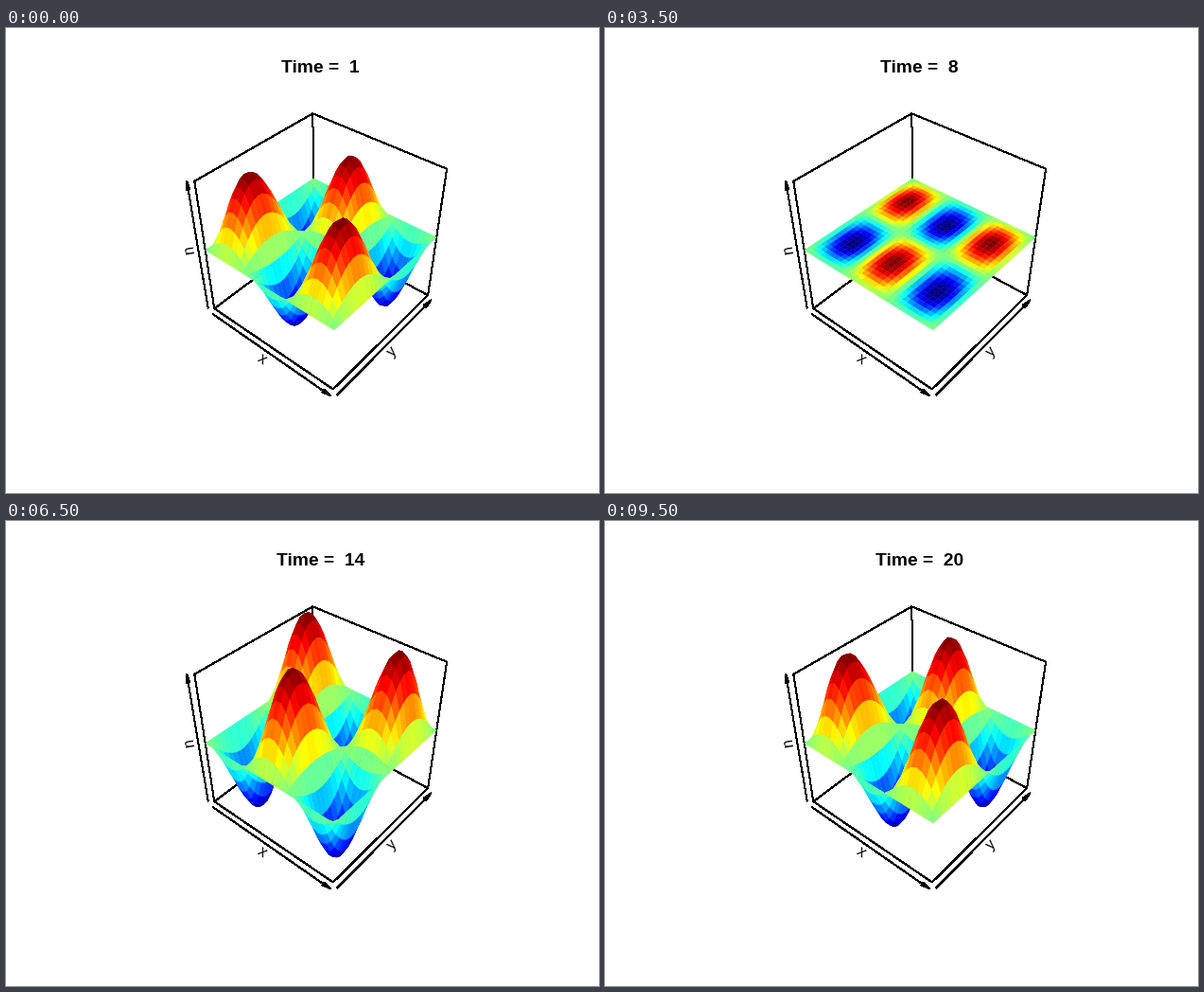
Write a matplotlib script that moves like this. It is 627 px wide and 491 px high and loops after 10000 ms.

```python
import numpy as np
import matplotlib.pyplot as plt
from matplotlib.animation import FuncAnimation
from matplotlib.collections import LineCollection, PolyCollection
from matplotlib.colors import LinearSegmentedColormap

W, H, DPI = 627, 491, 64
PX = 72 / DPI                      # points per pixel
N_FRAMES, INTERVAL = 20, 500
GRID_POINTS = 30
OMEGA = 0.03 * np.pi * np.sqrt(13)  # phase advance per step
THETA = PHI = np.radians(40)
DISTANCE = np.sqrt(3) + 6
BOX_CENTER, BOX_HEIGHT = (332.7, 235.9), 291.1

JET = LinearSegmentedColormap.from_list(
    "jet_dark", ["#00007F", "#0000FF", "#007FFF", "#00FFFF", "#7FFF7F",
                 "#FFFF00", "#FF7F00", "#FF0000", "#7F0000"], N=100)


def perspective(x, y, z):
    """Project points of the [-1, 1] cube to the view plane."""
    right = x * np.cos(THETA) + y * np.sin(THETA)
    near = x * np.sin(THETA) - y * np.cos(THETA)
    up = z * np.cos(PHI) - near * np.sin(PHI)
    depth = DISTANCE - z * np.sin(PHI) - near * np.cos(PHI)
    return np.stack([right / depth, up / depth], axis=-1)


signs = np.array([(x, y, z) for x in (-1, 1) for y in (-1, 1) for z in (-1, 1)])
corners = perspective(*signs.T)
low, high = corners.min(axis=0), corners.max(axis=0)
SCALE = BOX_HEIGHT / (high[1] - low[1])


def to_pixels(x, y, z):
    return BOX_CENTER + (perspective(x, y, z) - (low + high) / 2) * (SCALE, -SCALE)


def arrow(start, tip, length=9.6, angle=10):
    """Shaft and open head as line segments."""
    start, tip = np.array(start), np.array(tip)
    back = (start - tip) / np.hypot(*(start - tip)) * length
    c, s = np.cos(np.radians(angle)), np.sin(np.radians(angle))
    wings = [tip + np.array([[c, -k * s], [k * s, c]]) @ back for k in (1, -1)]
    return [[start, tip], [wings[0], tip, wings[1]]]


fig = plt.figure(figsize=(W / DPI, H / DPI), dpi=DPI, facecolor="white")
ax = fig.add_axes([0, 0, 1, 1])
ax.set_xlim(0, W)
ax.set_ylim(H, 0)
ax.axis("off")

# Box: every edge except those meeting the near top corner.
near_top = (1, -1, 1)
edges = []
for i, a in enumerate(signs):
    for b in signs[i + 1:]:
        touches = near_top in (tuple(a), tuple(b))
        if np.sum(a != b) == 1 and not touches:
            edges.append([to_pixels(*a), to_pixels(*b)])

axis_lines = (arrow((218.3, 301.8), (342.8, 388.2))
              + arrow((349.8, 387.8), (449.5, 287.3))
              + arrow((213.7, 296.0), (191.2, 161.8)))
ax.add_collection(LineCollection(edges + axis_lines, colors="black",
                                 linewidths=PX, antialiaseds=False, zorder=1))

for name, x, y, angle in (("x", 271, 350, -34.7), ("y", 408.3, 342, 45.2),
                          ("u", 192, 236, -80.5)):
    ax.text(x, y, name, family="Liberation Sans", size=16 * PX, rotation=angle,
            rotation_mode="anchor", ha="center", va="center")
title = ax.text(BOX_CENTER[0], 47, "", family="Liberation Sans", weight="bold",
                size=19.2 * PX, ha="center", va="baseline")

grid = np.linspace(0, 1, GRID_POINTS)
gx, gy = np.meshgrid(grid, grid[::-1])  # rows run from the far side to the near side
mode = np.sin(3 * np.pi * gx) * np.sin(2 * np.pi * gy)
surface = PolyCollection([], linewidths=0.4 * PX, zorder=2)
ax.add_collection(surface)


def cell_corners(a):
    return np.stack([a[:-1, :-1], a[:-1, 1:], a[1:, 1:], a[1:, :-1]], axis=2)


def update(step):
    u = mode * (np.cos(OMEGA * step) + np.sin(OMEGA * step))
    points = to_pixels(2 * gx - 1, 2 * gy - 1, u)
    surface.set_verts(cell_corners(points).reshape(-1, 4, 2))
    level = cell_corners(u).mean(axis=2).ravel()
    colors = JET((level - level.min()) / np.ptp(level))
    surface.set_facecolor(colors)
    surface.set_edgecolor(colors)
    title.set_text(f"Time =  {step + 1}")
    return surface, title


anim = FuncAnimation(fig, update, frames=N_FRAMES, interval=INTERVAL,
                     repeat=True, repeat_delay=0)
plt.show()
```
